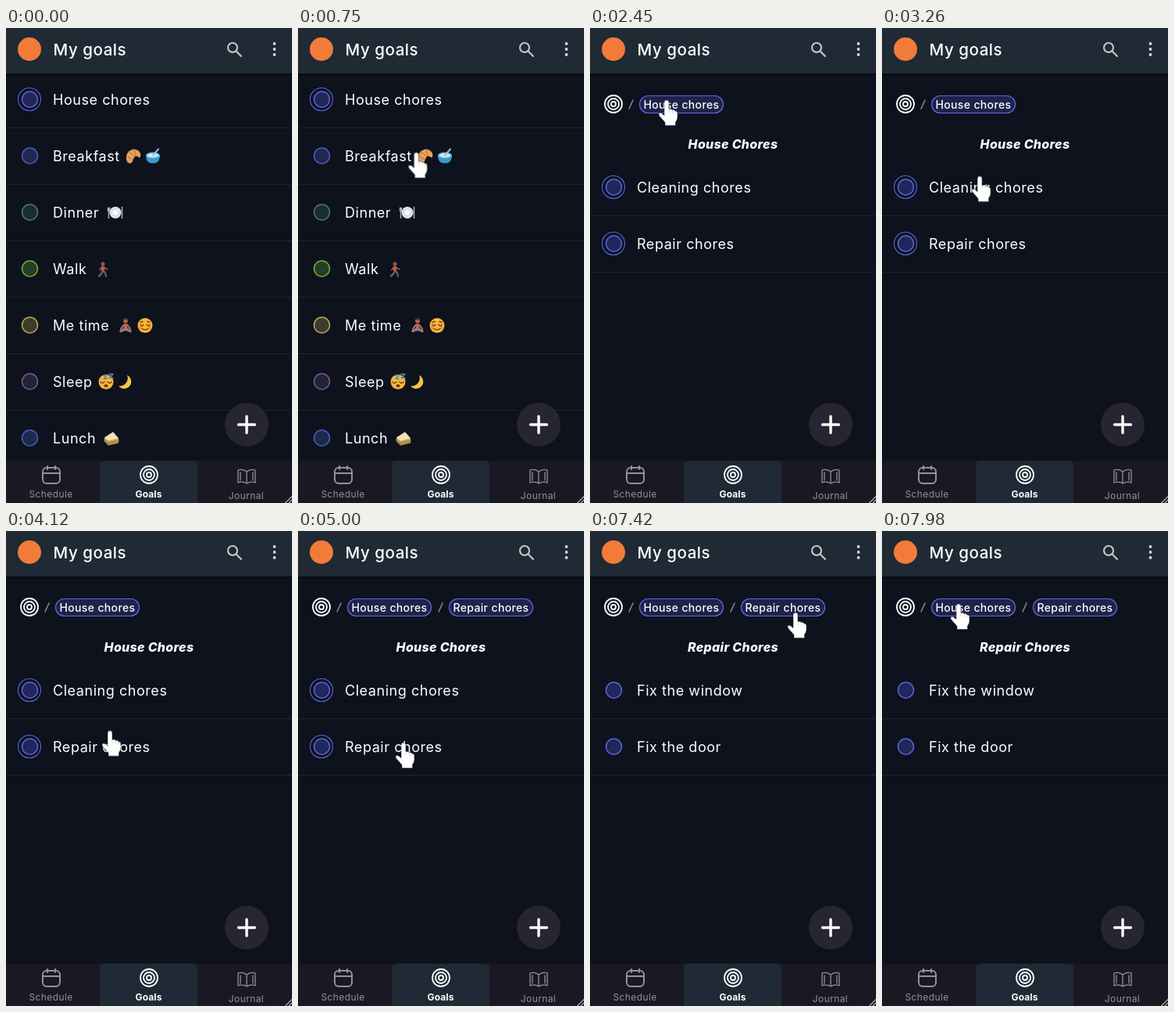
An HTML page for the animation above (8 s loop, 366 px wide and 606 px high).

```html
<!DOCTYPE html>
<html lang="en">
<head>
<meta charset="utf-8">
<title>My goals</title>
<style>
  html, body { margin: 0; width: 100%; height: 100%; overflow: hidden; background: #0e121d; }
  svg { display: block; width: 366px; height: 606px; font-family: Inter, "Open Sans", sans-serif; }
  text { fill: #fff; }
  .row { font-size: 18px; letter-spacing: .55px; }
  .chip { font-size: 14px; font-weight: 500; letter-spacing: .35px; }
  .head { font-size: 16px; font-weight: 800; font-style: italic; letter-spacing: .3px; text-anchor: middle; }
  .tab { font-size: 12px; letter-spacing: .4px; text-anchor: middle; fill: #92919c; }
  .tab.on { fill: #fff; font-weight: 700; letter-spacing: .1px; }
  .line { fill: none; stroke-linecap: round; stroke-linejoin: round; }
</style>
</head>
<body>
<svg viewBox="0 0 366 606">
  <defs>
    <linearGradient id="shade" x2="0" y2="1">
      <stop stop-color="#000" stop-opacity=".4"/><stop offset="1" stop-color="#000" stop-opacity="0"/>
    </linearGradient>
    <g id="target" class="line" stroke="#fff" stroke-width="1.8">
      <circle r="11"/><circle r="7"/><circle r="3"/>
    </g>
    <g id="croissant">
      <path fill="#e5a35c" d="M-8 7C-12-3-4-10 3-8.500 9-7 11-1 8 2 5 0 2-1 1 2-1 5-1 9-4 9-6 9-7 8.500-8 7Z"/>
      <path class="line" stroke="#b86f32" d="M-9 0L-1 4M-6-6L1 0M1-9L3-1"/>
    </g>
    <g id="bowl">
      <path fill="#3699d4" d="M-9-1Q-9 8-2 9H3Q9 7 9-1Z"/>
      <ellipse cy="-1" rx="9" ry="4" fill="#63bbe9"/>
      <ellipse cy="-1" rx="7" ry="2.600" fill="#d9e7ee"/>
      <path class="line" stroke="#aab9c4" stroke-width="2" d="M0-1L7-9"/>
    </g>
    <g id="plate">
      <circle r="7.500" fill="#e4e7ea"/><circle r="4.500" fill="#f7f8f8" stroke="#c4c9ce"/>
      <path class="line" stroke="#a9b1b9" stroke-width="1.500" d="M-8.500-6V7M-9.500-6V-2H-7.500V-6M8.500-7V7"/>
    </g>
    <g id="walker" class="line">
      <circle cy="-6.500" r="2.500" fill="#8f5b41"/>
      <path stroke="#4d6270" stroke-width="2.500" d="M0 2L3 5 4 9M0 2L-2 6-5 9"/>
      <path stroke="#c6593c" stroke-width="4" d="M0-2V1"/>
      <path stroke="#9c6448" stroke-width="1.600" d="M-1-3L-4 1M1-3L4 0 6 0"/>
    </g>
    <g id="lotus" class="line">
      <circle cy="-6" r="3" fill="#a87052"/><path fill="#4b3328" d="M-3-6Q0-13 3-6Q0-8-3-6Z"/>
      <path stroke="#b5795a" stroke-width="2" d="M-2-1L-6 4M2-1L6 4"/>
      <path stroke="#c8604f" stroke-width="5" d="M0 0V3"/>
      <path stroke="#8d7d88" stroke-width="3.500" d="M-6 7Q0 3 6 7"/>
    </g>
    <g id="relieved" class="line">
      <circle r="9.500" fill="#fbb638"/>
      <path stroke="#6a401a" stroke-width="1.400" d="M-6-1Q-4 2-2-1M2-1Q4 2 6-1M-4 4Q0 7 4 4M-6-4L-3-5M6-4L3-5"/>
      <circle cx="-6" cy="3" r="2" fill="#f28a45"/><circle cx="6" cy="3" r="2" fill="#f28a45"/>
    </g>
    <g id="sleeper" class="line">
      <circle r="9.500" fill="#fbb638"/>
      <path stroke="#6a401a" stroke-width="1.400" d="M-7 0Q-5 3-2 0M2 0Q5 3 7 0"/>
      <ellipse cy="5" rx="2.500" ry="2" fill="#6a401a"/>
      <path stroke="#4987c0" stroke-width="1.600" d="M-3-8H1L-3-4H1M4-10H9L4-5H9"/>
    </g>
    <path id="moon" fill="#f6c443" d="M3-8.500A9 9 0 1 1-8 5 10 10 0 0 0 3-8.500Z"/>
    <g id="sandwich">
      <path fill="#d9a45c" d="M-9-1L2-8 9 0V6L-4 9-9 4Z"/>
      <path fill="#f5e1b4" d="M-9-1L2-8 9 0-4 3Z"/>
      <path class="line" stroke="#6fae3a" stroke-width="1.600" d="M-9 2L-4 5.500 9 2.500"/>
      <path class="line" stroke="#d2553c" d="M-8 4L-4 7.200 8 4.600"/>
    </g>
  </defs>

  <rect width="366" height="606" fill="#0e121d"/>
  <g id="goals"></g>
  <g id="house"></g>
  <g id="repair"></g>
  <g id="crumbs"></g>

  <rect y="58" width="366" height="5" fill="url(#shade)"/>
  <rect width="366" height="58" fill="#1f2a35"/>
  <circle cx="30" cy="27" r="15" fill="#f37b3a"/>
  <text x="60.500" y="35" font-size="20.500" font-weight="500" letter-spacing=".55">My goals</text>
  <g class="line" stroke="#c6c9cc" stroke-width="2.100">
    <circle cx="290" cy="25" r="6"/><path d="M295 30L301 36"/>
  </g>
  <g fill="#d5d8da">
    <circle cx="343.500" cy="20" r="1.900"/><circle cx="343.500" cy="27" r="1.900"/><circle cx="343.500" cy="34" r="1.900"/>
  </g>

  <circle cx="308" cy="506" r="28" fill="#272531"/>
  <path class="line" stroke="#fff" stroke-width="3.400" d="M297.500 506H318.500M308 495.500V516.500"/>

  <rect y="552" width="366" height="54" fill="#1a1822"/>
  <path fill="#1f2a36" d="M120 606V558Q120 552 126 552H239Q245 552 245 558V606Z"/>
  <g class="line" stroke="#92919c" stroke-width="2">
    <rect x="47" y="561" width="22" height="20" rx="5"/><path d="M47 568H69M53 559V563M63 559V563"/>
    <path stroke-width="1.300" d="M308 566Q303 562 297 564V580Q303 578 308 581Q313 578 319 580V564Q313 562 308 566ZV581M300 567V577M316 567V577"/>
  </g>
  <use href="#target" x="183" y="570"/>
  <text class="tab" x="57.500" y="599">Schedule</text>
  <text class="tab on" x="182.500" y="599">Goals</text>
  <text class="tab" x="307.500" y="601">Journal</text>
  <path class="line" stroke="#b0b0b3" stroke-width="1.200" d="M357.500 606L366 597.500M362 606L366 602"/>

  <g id="cursor">
    <circle id="press" r="18" fill="#ff0" fill-opacity=".5"/>
    <g transform="translate(-1 0)">
      <path fill="#fff" stroke="#14161d" stroke-width=".5" d="M-3 3A3 3 0 0 1 3 3V11.500Q6 10.500 7.500 12.500Q10 11.500 11 14Q14 13.500 14 17V22Q14 25 11.500 28V32.500H-2V28.500L-9.500 20Q-11 17.500-9 16.300Q-7 15.500-3 19.500Z"/>
      <path class="line" stroke="#c9cbd0" stroke-width=".7" d="M3 12V15.500M7.500 13V16.500M11 14.500V17.500"/>
    </g>
  </g>
</svg>

<script>
const LOOP = 8000;
const $ = id => document.getElementById(id);
const indigo = ['#5a63d8', '#20275a'];

const divider = y => `<path d="M0 ${y + 36.5}H366" stroke="#1d2430"/>`;

function row(y, label, [stroke, fill], ring, icons = []) {
  const dot = `<circle cx="30.5" cy="${y}" r="10" fill="${fill}" stroke="${stroke}" stroke-width="1.500"/>`;
  const halo = ring ? `<circle cx="30" cy="${y}" r="14.500" fill="none" stroke="${stroke}" stroke-width="1.100"/>` : '';
  const pics = icons.map(([id, x]) => `<use href="#${id}" x="${x}" y="${y + .5}"/>`).join('');
  return `${halo}${dot}<text class="row" x="60" y="${y + 7}">${label}</text>${pics}`;
}

const goals = [
  ['Breakfast', ['#4c5bbb', '#1e2850'], [['croissant', 163], ['bowl', 188]]],
  ['Dinner', ['#4c7a64', '#1a2d33'], [['plate', 140]]],
  ['Walk', ['#6fae35', '#263e24'], [['walker', 124]]],
  ['Me time', ['#c2a748', '#3b3c30'], [['lotus', 153], ['relieved', 178]]],
  ['Sleep', ['#6e5c94', '#272138'], [['sleeper', 128], ['moon', 152]]],
  ['Lunch', ['#4063b2', '#1b2b50'], [['sandwich', 135]]]
];

$('goals').innerHTML = row(91, 'House chores', indigo, true) + `<g id="below">${divider(91)}` +
  goals.map(([label, color, icons], i) => {
    const y = 163 + 72 * i;
    return row(y, label, color, false, icons) + divider(y);
  }).join('') + '</g>';

const subpage = (title, first, second, ring) =>
  `<text class="head" x="183" y="154">${title}</text>` +
  row(203, first, indigo, ring) + divider(203) + row(275, second, indigo, ring) +
  `<g class="end">${divider(275)}</g>`;

$('house').innerHTML = subpage('House Chores', 'Cleaning chores', 'Repair chores', true);
$('repair').innerHTML = subpage('Repair Chores', 'Fix the window', 'Fix the door', false);

const chip = (x, label) =>
  `<path class="line" stroke="#85868d" stroke-width="1.600" d="M${x - 13} 103L${x - 8} 92"/>
   <rect x="${x + .5}" y="86.500" width="107" height="22" rx="11" fill="#1e2349" stroke="#5f69e6" stroke-width="1.200"/>
   <text class="chip" x="${x + 5.5}" y="102.500">${label}</text>`;

$('crumbs').innerHTML = '<use href="#target" x="30" y="97"/>' + chip(63, 'House chores') +
  `<g id="crumb2">${chip(193, 'Repair chores')}</g>`;

const play = (el, frames) => el.animate(frames, { duration: LOOP, iterations: Infinity });

// Holds one value inside the given spans and another outside them.
function toggle(el, prop, on, off, ...spans) {
  const steps = [[0, off]];
  for (const [from, to] of spans) {
    if (from === 0) steps[0][1] = on; else steps.push([from, on]);
    steps.push([to, off]);
  }
  if (steps.at(-1)[0] < LOOP) steps.push([LOOP, off]);
  play(el, steps.map(([t, v]) => ({ offset: t / LOOP, [prop]: v, easing: 'steps(1, end)' })));
}
const show = (el, ...spans) => toggle(el, 'opacity', 1, 0, ...spans);
const push = (el, ...spans) => toggle(el, 'transform', 'translate(0px, 48px)', 'translate(0px, 0px)', ...spans);

show($('goals'), [0, 2030]);
show($('house'), [2030, 5050]);
show($('repair'), [5050, LOOP]);
show($('crumbs'), [2030, LOOP]);
show($('crumb2'), [5000, LOOP]);
push($('below'), [1800, 2030]);
push(document.querySelector('#house .end'), [4700, 5000]);
show($('press'), [1650, 1850], [4490, 4830]);

// time, x, y, easing towards the next stop
const soft = 'ease-in-out', out = 'ease-out', into = 'ease-in';
const path = [
  [0, 306, 640], [229, 306, 640], [230, 306, 598], [640, 160, 230, out], [960, 145, 89], [1090, 145, 89, soft],
  [1600, 99, 83], [2030, 99, 83, soft], [2790, 99, 98], [2840, 99, 98, soft],
  [3260, 126, 189, out], [3640, 127, 209], [3690, 128, 209, soft], [4350, 136, 270],
  [5050, 136, 270, soft], [5770, 156, 286], [5850, 156, 286, into], [6100, 118, 94, out],
  [6610, 35, 90], [6660, 47, 104, soft], [7420, 264, 104], [7500, 264, 105, into],
  [7740, 180, 111, out], [7980, 99, 93], [LOOP, 99, 93]
];
play($('cursor'), path.map(([t, x, y, easing = 'linear']) =>
  ({ offset: t / LOOP, transform: `translate(${x}px, ${y}px)`, easing })));
</script>
</body>
</html>
```
